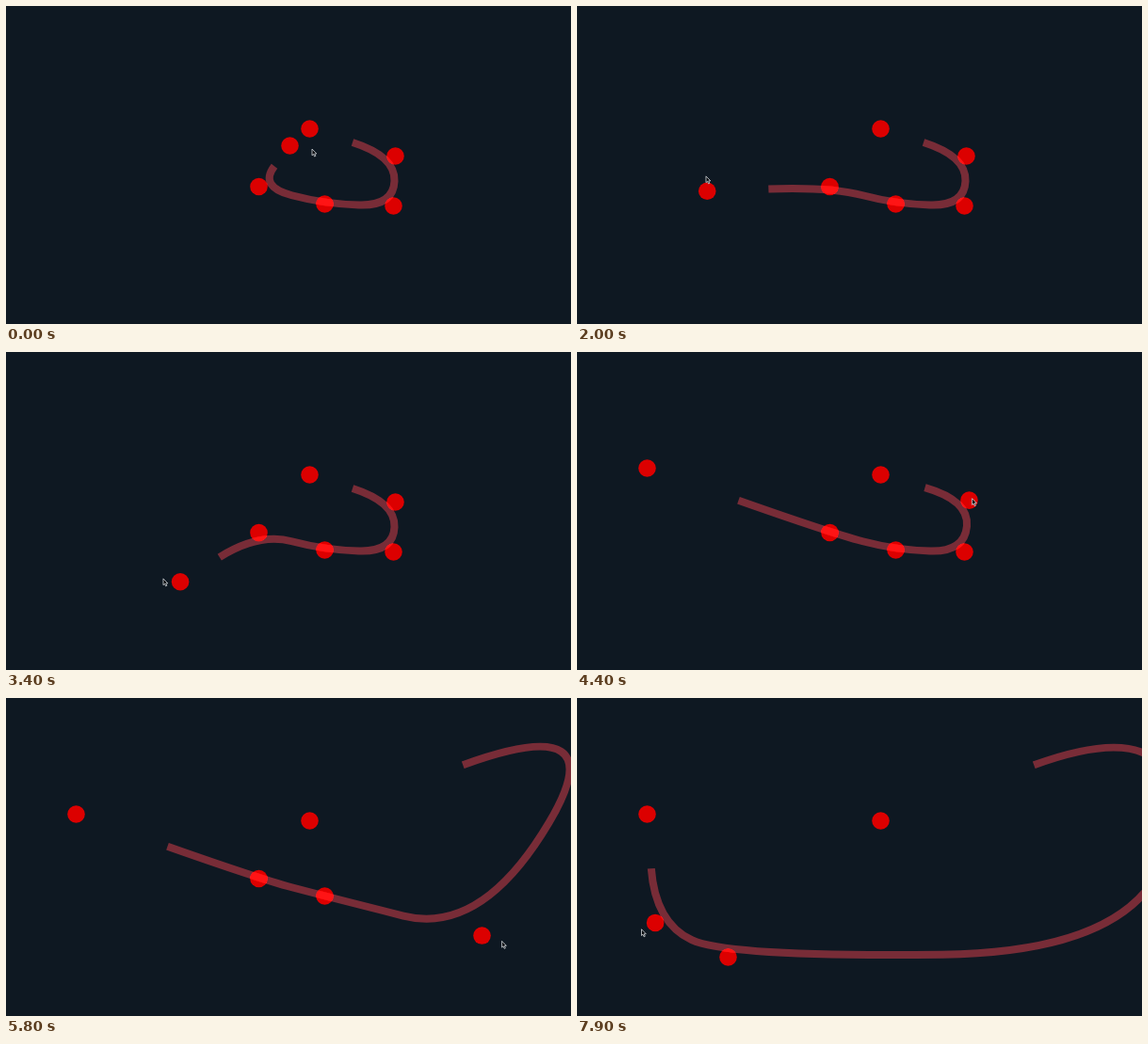
Write an HTML page with a canvas that moves like this. It is 600 px wide and 338 px high and loops after 8 s.

```html
<!DOCTYPE html>
<html lang="en">
<head>
<meta charset="utf-8">
<title>Draggable curve</title>
<style>
  html, body { margin: 0; width: 100%; height: 100%; overflow: hidden; background: #0e1822; }
  canvas { display: block; width: 600px; height: 338px; }
</style>
</head>
<body>
<canvas id="stage" width="600" height="338"></canvas>
<script>
const ctx = document.getElementById('stage').getContext('2d');
const LOOP = 8000, STEP = 100;
const LAG = 15;      // a dragged point trails the mouse by this many ms
const BEAT = 385;    // half a turn of the swirling drag

const home = [[322.5, 130.5], [413.5, 159.5], [411.5, 212.5], [338.5, 210.5], [268.5, 192], [301.5, 148.5]];

const ease = u => (1 - Math.cos(Math.PI * u)) / 2;
const mix = (a, b, u) => a + (b - a) * u;
const middle = (a, b) => [mix(a[0], b[0], 0.5), mix(a[1], b[1], 0.5)];

// Eased straight move to a place; sag bows the path up or down.
function glide(start, end, to, point, sag = 0) {
  const at = (from, t) => {
    const e = ease((t - start) / (end - start));
    return [mix(from[0], to[0], e), mix(from[1], to[1], e) + sag * Math.sin(Math.PI * e)];
  };
  return { start, end, point, at };
}

// Oscillates through its turning points, one per beat.
function swing(turns, beats) {
  const p = Math.min(Math.max(beats, 0), turns.length - 1);
  const i = Math.min(Math.floor(p), turns.length - 2);
  return mix(turns[i], turns[i + 1], ease(p - i));
}

// Clockwise laps: x and y swing about a quarter turn apart.
function swirl(start, end, point) {
  const xs = [301.5, 145, 330, 80, 473, 137, 587, 120, 391, 74.5];
  const ys = [148.5, 82, 200, 101, 322, 62, 322, 62, 249, 123.5];
  const at = (from, t) => [swing(xs, (t - start) / BEAT), swing(ys, (t - start - 182) / BEAT)];
  return { start, end, point, at };
}

// Moves with a point number drag that point.
const moves = [
  glide(0, 75, home[5]),
  swirl(75, 3722, 5),
  glide(3722, 4300, home[1]),
  glide(4350, 4836, [648, 12], 1),
  glide(4836, 5400, home[2]),
  glide(5677, 5904, [615, 270], 2, 13.6),
  glide(6200, 6650, home[3]),
  glide(6690, 6980, [155, 279], 3),
  glide(7020, 7150, [160.5, 275.5], 3),
  glide(7200, 7500, home[4]),
  glide(7664, 7997, [20, 270], 4, -15.7)
];

function mouse(t) {
  let pos = [325, 152];
  for (const m of moves) {
    if (t < m.start) break;
    pos = m.at(pos, Math.min(t, m.end));
  }
  return pos;
}

function pointsAt(t) {
  const points = home.slice();
  for (const { start, end, point } of moves) {
    if (point !== undefined && t - LAG >= start) points[point] = mouse(Math.min(t - LAG, end));
  }
  return points;
}

function drawDots(points) {
  ctx.fillStyle = '#dc0000';
  for (const [x, y] of points) {
    ctx.beginPath();
    ctx.arc(x, y, 9.3, 0, Math.PI * 2);
    ctx.fill();
  }
}

// Quadratic spline through the midpoints, added as light.
function drawCurve(points) {
  ctx.globalCompositeOperation = 'lighter';
  ctx.strokeStyle = 'rgb(106,20,21)';
  ctx.lineWidth = 8;
  ctx.beginPath();
  ctx.moveTo(...middle(points[0], points[1]));
  for (let i = 1; i < points.length - 1; i++) {
    ctx.quadraticCurveTo(...points[i], ...middle(points[i], points[i + 1]));
  }
  ctx.stroke();
  ctx.globalCompositeOperation = 'source-over';
}

const arrow = new Path2D('M0 0V6.8L1.5 5.4L2.6 8L3.8 7.5L2.7 5H4.8Z');

function drawCursor([x, y]) {
  ctx.save();
  ctx.translate(x, y);
  ctx.fillStyle = '#05080c';
  ctx.strokeStyle = '#d5d8dc';
  ctx.lineWidth = 0.8;
  ctx.fill(arrow);
  ctx.stroke(arrow);
  ctx.restore();
}

function draw(t) {
  const points = pointsAt(t);
  ctx.fillStyle = '#0e1822';
  ctx.fillRect(0, 0, 600, 338);
  drawDots(points);
  drawCurve(points);
  drawCursor(mouse(t));
}

const begin = performance.now();
function tick() {
  const t = (performance.now() - begin) % LOOP;
  draw(Math.floor(t / STEP) * STEP);
  requestAnimationFrame(tick);
}
tick();
</script>
</body>
</html>
```
